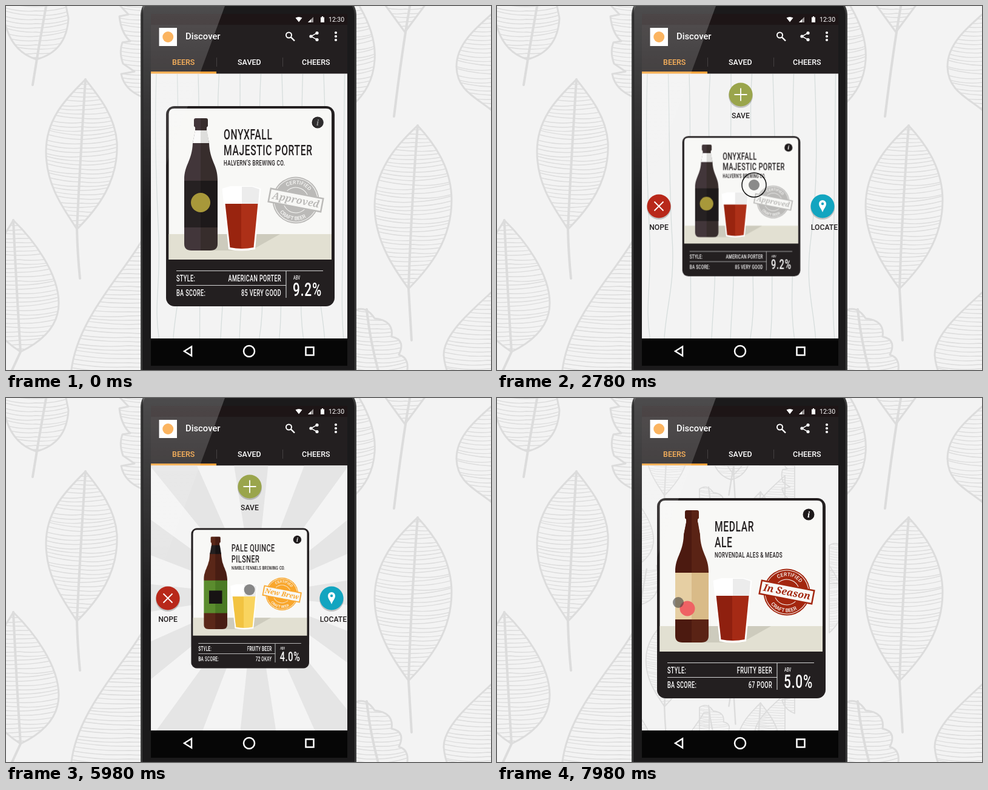
These frames come from a looping animation (800 by 600 pixels, 8 s). An HTML page:

```html
<!DOCTYPE html>
<html lang="en">
<head>
<meta charset="utf-8">
<title>Beer discovery app</title>
<style>
  html, body { margin: 0; width: 100%; height: 100%; overflow: hidden; background: #f3f3f3; }
  #stage, #stage > *, .full { position: absolute; left: 0; top: 0; width: 800px; height: 600px; }
  #stage { overflow: hidden; }
  #screen { clip-path: inset(111.5px 237px 52px 239px); background: #f3f3f3; }
  .card { position: absolute; left: 264px; top: 165px; width: 278px; height: 330px; overflow: visible; }
  text { font-family: Roboto, sans-serif; }
  .narrow { font-weight: 500; letter-spacing: .04em; }
  .medium { font-weight: 500; }
  .info { font: italic bold 15px "Liberation Serif", serif; }
  .script { font: italic 600 16px "Noto Serif", serif; }
</style>
</head>
<body>
<div id="stage">
  <svg id="backdrop"></svg>
  <div id="screen"></div>
  <svg id="overlay"></svg>
</div>
<script>
const INK = '#231f20', PAPER = '#f8f8f6', ORANGE = '#faa33c', LEAF = '#dcdcdc';
const $ = id => document.getElementById(id);
const range = n => [...Array(n).keys()];

let seed = 7;
const random = () => (seed = seed * 16807 % 2147483647) / 2147483647;

const text = (x, y, size, str, attrs = '') =>
  `<text x="${x}" y="${y}" font-size="${size}" ${attrs}>${str}</text>`;
const narrow = (x, y, size, str, attrs = '') =>
  `<text class="narrow" transform="translate(${x} ${y}) scale(.65 1)" font-size="${size}" ${attrs}>${str}</text>`;
const rect = (x, y, w, h, fill, rx = 0) =>
  `<rect x="${x}" y="${y}" width="${w}" height="${h}" rx="${rx}" fill="${fill}"/>`;
const circle = (x, y, r, fill) => `<circle cx="${x}" cy="${y}" r="${r}" fill="${fill}"/>`;
const line = (d, color, width) => `<path d="${d}" fill="none" stroke="${color}" stroke-width="${width}"/>`;
const END = 'text-anchor="end"', MIDDLE = 'text-anchor="middle"';

// ---------- Leaves ----------
let leafCount = 0;
function leaf(outline, [x0, y0, x1, y1], rib) {
  const id = 'leaf' + leafCount++, cx = (x0 + x1) / 2;
  let veins = '';
  for (let y = y0 - 6; y < y1; y += 7) {
    const a = y + random() * 5, b = y + random() * 5;
    veins += `M${x0} ${a}Q${(x0 + cx) / 2} ${a + 9} ${cx} ${y + 10}Q${(x1 + cx) / 2} ${b + 9} ${x1} ${b}`;
  }
  return `<clipPath id="${id}"><path d="${outline}"/></clipPath>
    <path d="${veins}" stroke-width="1.4" clip-path="url(#${id})"/>
    <path d="${outline}" stroke-width="3"/><path d="${rib}" stroke-width="4"/>`;
}

const leaves = `<g id="leaves" fill="none" stroke="${LEAF}" stroke-linecap="round" stroke-linejoin="round">` +
  leaf('M-6 -20Q-8 70 50 88Q100 75 103 20L95 -20', [-6, -10, 104, 88], 'M68 -10Q55 60 44 130') +
  leaf('M165 -25L202 14L187 17Q190 45 205 58L192 60Q186 75 193 95L212 108L190 112Q195 138 225 150V-25Z', [175, -10, 290, 150], '') +
  leaf('M131 121C108 145 66 180 66 240C66 300 100 340 117 368C150 335 186 290 183 225C180 180 150 145 131 121Z',
    [64, 125, 186, 368], 'M131 121Q122 260 117 368Q118 410 122 449') +
  leaf('M12 353C45 385 87 440 87 490C87 530 55 555 24 570C0 555 -40 520 -40 470C-40 420 -5 385 12 353Z',
    [-45, 358, 88, 570], 'M12 353Q18 480 24 570L10 600') +
  leaf('M225 385C195 440 112 520 107 610H240V385Z', [105, 395, 300, 610], '') +
  leaf('M612 -20L658 43L705 -20', [612, -20, 705, 43], 'M668 -10Q655 60 640 182') +
  leaf('M570 -20Q612 40 608 90Q605 135 570 165Z', [520, -10, 610, 165], '') +
  leaf('M805 10C770 40 743 65 743 100C744 140 775 150 805 175Z', [742, 10, 860, 175], '') +
  leaf('M679 197C650 225 608 265 608 330C608 390 645 440 664 466C700 430 735 385 735 320C735 265 705 225 679 197Z',
    [607, 200, 736, 466], 'M679 197Q668 340 664 466L669 551') +
  leaf('M570 505Q592 490 608 515Q640 518 636 545Q660 550 648 575Q668 580 660 610H570Z', [560, 500, 664, 610], 'M595 500Q600 550 615 605') +
  leaf('M805 468C770 500 722 540 722 575Q724 600 735 615H805Z', [720, 475, 870, 610], '') + '</g>';

// ---------- Phone and app bar ----------
const appBar = rect(239, 13, 324, 18, '#1d1516') + rect(239, 31, 324, 81, INK) +
  `<g fill="#fff">
    <path d="M477.5 19.5q5.500 -3 11 0l-5.500 7z"/>
    <path d="M507 18v9h-9z" opacity=".55"/><path d="M503 22v5h-5z"/>
    <path d="M519 18.500h2v-1.500h2v1.500h2v8.500h-6z"/>
    ${text(532, 26, 10.5, '12:30')}
    ${text(296, 55, 14.8, 'Discover', 'class="medium"')}
    ${text(382, 96.5, 12.5, 'SAVED', 'class="medium"')}
    ${text(488, 96.5, 12.5, 'CHEERS', 'class="medium"')}
    ${[44, 50, 56].map(y => circle(544, y, 2.1, '#fff')).join('')}
    ${circle(503, 50, 2.6, '#fff') + circle(513, 44.5, 2.6, '#fff') + circle(513, 55.5, 2.6, '#fff')}
  </g>
  <circle cx="466.5" cy="48" r="4.500" fill="none" stroke="#fff" stroke-width="2"/>` +
  line('M470 51.500L476 57.500', '#fff', 2.4) + line('M513 44.500L503 50L513 55.500', '#fff', 1.5) +
  text(274, 96.5, 12.5, 'BEERS', `class="medium" fill="${ORANGE}"`) +
  line('M347.500 85V100M456.500 85V100', '#454142', 1) + rect(239, 108, 108, 4, ORANGE) +
  rect(252.5, 36, 29.5, 30, '#fff') + circle(267.2, 51, 9, ORANGE);

const navBar = rect(239, 548, 324, 45, '#060606') +
  line('M294 569L306 561.500V576.500Z', '#fff', 2.5) +
  line('M392 569a9 9 0 1 0 18 0a9 9 0 1 0 -18 0', '#fff', 2.5) +
  line('M494.500 562.500h13v13h-13z', '#fff', 2.5);

$('backdrop').innerHTML = leaves +
  '<rect x="223.500" y="-18" width="353" height="660" rx="34" fill="#1b1a1b" stroke="#3c3c3c" stroke-width="3"/>' +
  appBar + navBar +
  text(430, 90, 11, '+1', 'id="plusOne" class="medium" fill="#fff"') +
  `<defs>
    <path id="arcTop" d="M-26.500 0A26.500 26.500 0 0 1 26.500 0"/>
    <path id="arcBottom" d="M-33 0A33 33 0 0 0 33 0"/>
  </defs>`;

// ---------- Screen wallpapers ----------
const planks = range(10).map(i => {
  const x = 248 + i * 34.5, w = () => (random() - .5) * 14;
  return line(`M${x} 112C${x + w()} 220 ${x + w()} 300 ${x + w()} 380S${x + w()} 490 ${x + w()} 548`, '#d6dddc', 1.3);
}).join('');

const polar = deg => `${410 + 400 * Math.sin(deg * Math.PI / 180)} ${325 - 400 * Math.cos(deg * Math.PI / 180)}`;
const sunburst = rect(239, 111, 324, 437, '#f4f4f4') + range(12).map(i => {
  const a = i * 30 - 1.5;
  return `<path fill="#e5e5e5" d="M410 325L${polar(a - 7.5)}L${polar(a + 7.5)}Z"/>`;
}).join('');

const foliage = rect(239, 111, 324, 437, '#f3f3f3') +
  [[-8, -153], [-8, 207], [206, -60], [206, 288], [356, 82], [356, 430]].map(([x, y]) =>
    `<use href="#leaves" transform="translate(${x} ${y}) scale(.6)"/>`).join('');

// ---------- Cards ----------
const halves = (id, a, b) => `<linearGradient id="${id}">
  <stop offset=".5" stop-color="${a}"/><stop offset=".5" stop-color="${b}"/></linearGradient>`;

const panel = rect(264, 165, 278, 330, INK, 14) +
  `<path fill="${PAPER}" d="M268.500 418V178q0 -9 9 -9H528q9 0 9 9V418Z"/>`;
const info = circle(514, 192, 9.5, '#1e1a1b') +
  text(514, 197, 15, 'i', `class="info" fill="#fff" ${MIDDLE}`);

const stamp = (color, word) => `<g transform="translate(478 320) rotate(11)" fill="${PAPER}">
  ${circle(0, 0, 38.5, color)}
  <circle r="36" fill="none" stroke="${PAPER}"/><circle r="21" fill="none" stroke="${PAPER}"/>
  <text font-size="8.500" class="medium" ${MIDDLE}><textPath href="#arcTop" startOffset="50%">CERTIFIED</textPath></text>
  <text font-size="8.500" class="medium" ${MIDDLE}><textPath href="#arcBottom" startOffset="50%">CRAFT BEER</textPath></text>
  <rect x="-44" y="-11" width="88" height="22" stroke="${color}" stroke-width="2.500"/>
  ${text(0, 5, 16, word, `class="script" fill="${color}" ${MIDDLE}`)}</g>`;

function front(i, c) {
  const fill = part => `url(#${part}${i})`;
  return `<defs>${halves('glass' + i, ...c.glass)}${halves('label' + i, ...c.label)}
    ${halves('neck' + i, ...c.neck)}${halves('beer' + i, ...c.beer)}${halves('foam' + i, '#fff', '#ececec')}</defs>` +
    panel + rect(268.5, 376, 268.5, 42, '#e2e0d2') +
    `<path fill="#cdcbbd" d="M350 376H452L404 403H325Z"/>
    <path fill="${fill('glass')}" d="M310 188q0 -3 3 -3h17q3 0 3 3v10l-2 2v6L335 226C336 255 349 262 349 286V392
      Q349 403 337 403H306Q294 403 294 392V286C294 262 307 255 308 226L312 206v-6l-2 -2Z"/>
    <path fill="${fill('neck')}" d="M312 205H331.500L335 226H308Z"/>` +
    rect(294, 288, 55, 77, fill('label')) + c.emblem +
    `<path fill="#fff" d="M356.500 301L370 297H407L420.500 301L411 401Q389 406 367 401Z"/>
    <path fill="${fill('foam')}" d="M359 302L371 298H406L418 302L416 326H361Z"/>
    <path fill="${fill('beer')}" d="M361.500 326H415.500L408.500 398Q389 402 369.500 398Z"/>` +
    stamp(...c.stamp) + info +
    `<g fill="${INK}">${narrow(359, 220, 24, c.name[0]) + narrow(359, 245.5, 24, c.name[1]) + narrow(359, 263, 12.5, c.brewer)}</g>` +
    line('M281 436.500H523M281 460.500H462M462 436.500V481', '#d5d5d5', 1.1) +
    `<g fill="#fff">${narrow(281, 453.5, 14, 'STYLE:') + narrow(454, 453.5, 14, c.style, END) +
      narrow(281, 477.5, 14, 'BA SCORE:') + narrow(454, 477.5, 14, c.score, END) +
      narrow(474, 451, 8.5, 'ABV') + narrow(473, 477.5, 32, c.abv)}</g>`;
}

const story = ['Halvern\u2019s Onyxfall Majestic Porter is loaded with', 'magnificent and robust flavor. Aged for seven',
  'months in Caribbean rum barrels, roasted malt', 'and chocolate character abound in this velvety,', 'nectarous ale.'];

const back = c => panel + info + `<g fill="${INK}">` +
  narrow(300, 213, 24, c.name[0]) + narrow(300, 238, 24, c.name[1]) + narrow(300, 254.5, 12.5, c.brewer) +
  story.map((s, i) => text(300, 281 + i * 12.5, 8.8, s)).join('') +
  narrow(300, 377, 14, 'LOCATION:') + narrow(446, 377, 14, 'OAKVILLE, ON', END) +
  narrow(300, 404, 14, 'VOLUME:') + narrow(446, 404, 14, '650 ML', END) + '</g>' +
  line('M300 355.500H507M300 385H455M455 355.500V407', INK, 1.3) + circle(484, 384, 21, '#a82a12') +
  `<g fill="#fff">${narrow(403, 455, 18, '\u201cDARK &amp; INTRIGUING AS THE', MIDDLE) +
    narrow(403, 474, 18, 'MIDNIGHT SKY\u201d', MIDDLE)}</g>`;

const NEVER = 1e9;
const cards = [
  { name: ['ONYXFALL', 'MAJESTIC PORTER'], brewer: 'HALVERN\u2019S BREWING CO.', style: 'AMERICAN PORTER', score: '85 VERY GOOD', abv: '9.2%',
    glass: ['#42363a', '#372d2c'], label: ['#262122', '#1d191a'], neck: ['#fafafa', '#dededc'], beer: ['#99240f', '#ad3018'],
    emblem: circle(321, 324, 16, '#a8983a'), stamp: ['#bbbab8', 'Approved'],
    enter: -NEVER, grab: [424, 295], shrink: 2560, release: 4080, target: [402, 146] },
  { name: ['PALE QUINCE', 'PILSNER'], brewer: 'NIMBLE FENNELS BREWING CO.', style: 'FRUITY BEER', score: '72 OKAY', abv: '4.0%',
    glass: ['#5a2718', '#481d13'], label: ['#5b8c2e', '#4a7a24'], neck: ['#231f20', '#171314'], beer: ['#f2c341', '#f9d45f'],
    emblem: rect(306, 312, 31, 31, '#171314'), stamp: ['#f9a62b', 'New Brew'],
    enter: 4420, grab: [402, 316], shrink: 5480, release: 6980, target: [267, 330] },
  { name: ['MEDLAR', 'ALE'], brewer: 'NORVENDAL ALES &amp; MEADS', style: 'FRUITY BEER', score: '67 POOR', abv: '5.0%',
    glass: ['#4c1a10', '#5a2315'], label: ['#e6cfa3', '#d9bb88'], neck: ['#4c1a10', '#5a2315'], beer: ['#8f200f', '#a52a15'],
    emblem: circle(314, 347, 12.5, '#ef6264'), stamp: ['#a3260f', 'In Season'],
    enter: 7280, grab: [0, 0], shrink: NEVER, release: NEVER, target: [0, 0] },
];

// ---------- Drop targets ----------
const buttons = [
  { x: 402, y: 146, label: 'SAVE', color: '#9aa54c', icon: line('M-10.500 0H10.500M0 -10.500V10.500', '#fff', 1.8) },
  { x: 267, y: 330, label: 'NOPE', color: '#b8281a', icon: line('M-7.500 -7.500L7.500 7.500M7.500 -7.500L-7.500 7.500', '#fff', 1.8) },
  { x: 537, y: 330, label: 'LOCATE', dx: 3, color: '#12a5c0',
    icon: '<path fill="#fff" d="M0 10C-2 4 -6 1 -6 -4a6 6 0 0 1 12 0C6 1 2 4 0 10Z"/>' + circle(0, -4, 2.2, '#12a5c0') },
];

const cardSvg = (id, body) => `<svg class="card" id="${id}" viewBox="264 165 278 330">${body}</svg>`;
$('screen').innerHTML =
  `<svg class="full">${planks}<g id="sunburst">${sunburst}</g><g id="foliage">${foliage}</g></svg>` +
  cards.map((c, i) => cardSvg('card' + i, front(i, c))).join('') + cardSvg('cardBack', back(cards[0])) +
  '<svg class="full">' + buttons.map(b => `<g id="${b.label}">${circle(0, 2, 20, '#0003') + circle(0, 0, 19.5, b.color)}${b.icon}
    ${text(b.dx || 0, 38.5, 12.2, b.label, `class="medium" fill="${INK}" ${MIDDLE}`)}</g>`).join('') + '</svg>';

const rippleStarts = [2620, 4020, 4180, 5520, 6780, 6940];
$('overlay').innerHTML = `<linearGradient id="sheen" x2="0" y2="1"><stop stop-color="#fff" stop-opacity=".22"/>
  <stop offset="1" stop-color="#fff" stop-opacity="0"/></linearGradient>
  <path fill="url(#sheen)" d="M226 0H361L226 365Z"/>
  <g id="pointer"><circle id="dot" r="9" fill="#3c3c3c" fill-opacity=".58"/>
  ${rippleStarts.map((_, i) => `<circle id="ripple${i}" fill="none" stroke="#111" stroke-width="1.500"/>`).join('')}</g>`;

// ---------- Motion ----------
const mix = (a, b, p) => a + (b - a) * p;
const linear = (t, a, b) => Math.min(1, Math.max(0, (t - a) / (b - a)));
const ramp = (t, a, b) => (1 - Math.cos(Math.PI * linear(t, a, b))) / 2;
const track = (t, keys) => keys.reduce((v, [time, value], i) =>
  i ? mix(v, value, ramp(t, keys[i - 1][0], time)) : value, 0);

const dotX = [[1500, 515], [2350, 424], [3050, 424], [3900, 429], [4400, 429], [4800, 423], [5000, 423], [5400, 402],
  [5950, 402], [6700, 291], [7200, 291], [7600, 299]];
const dotY = [[1500, 192], [2350, 295], [3050, 295], [3900, 151], [4400, 151], [4800, 181], [5000, 181], [5400, 316],
  [5950, 316], [6700, 336], [7200, 336], [7600, 337]];
const flip = [[100, 0], [720, 180], [860, 180], [1480, 0]];

// A button pops in, then either swells under the held card or bows out.
function buttonScale(t, label) {
  const round = t < 4400 ? { start: 2600, chosen: 'SAVE', hover: 3500, end: 4120 }
    : { start: 5520, chosen: 'NOPE', hover: 6350, end: 7020 };
  const shown = ramp(t, round.start, round.start + 140), over = ramp(t, round.hover, round.hover + 300);
  return label === round.chosen ? shown * (1 + .58 * over) * (1 - ramp(t, round.end, round.end + 140))
    : shown * (1 - over);
}

function poseCard(el, c, t, x, y, turn) {
  const held = ramp(t, c.shrink, c.shrink + 180), gone = ramp(t, c.release, c.release + 160);
  const dx = (x - c.grab[0]) * held, dy = (y - c.grab[1]) * held;
  const scale = ramp(t, c.enter, c.enter + 340) * (1 - .3 * held) * (1 - gone);
  const cx = mix(dx * .7, c.target[0] - 403, gone), cy = mix(dy * .715, c.target[1] - 330, gone);
  el.style.transform = `translate(${cx}px, ${cy}px) scale(${scale}) perspective(850px)
    rotateX(${-dy * .21}deg) rotateY(${turn + dx * .37}deg)`;
  el.style.visibility = scale > .001 ? 'visible' : 'hidden';
}

function draw(now) {
  const elapsed = now % 8000;
  const t = elapsed < 100 ? 0 : 100 + 40 * Math.floor((elapsed - 100) / 40);
  const x = track(t, dotX), y = track(t, dotY), turn = track(t, flip);

  cards.forEach((c, i) => poseCard($('card' + i), c, t, x, y, i ? 0 : turn));
  poseCard($('cardBack'), cards[0], t, x, y, turn - 180);
  if (turn > 90) $('card0').style.visibility = 'hidden';
  else $('cardBack').style.visibility = 'hidden';

  $('sunburst').setAttribute('opacity', ramp(t, 4160, 4400));
  $('foliage').setAttribute('opacity', ramp(t, 7060, 7300));
  $('plusOne').setAttribute('opacity', track(t, [[4400, 0], [4500, 1], [4750, 1], [5030, 0]]));

  for (const b of buttons)
    $(b.label).setAttribute('transform', `translate(${b.x} ${b.y}) scale(${buttonScale(t, b.label)})`);

  $('pointer').setAttribute('transform', `translate(${x} ${y})`);
  $('dot').setAttribute('opacity', track(t, [[6860, 1], [6940, .3], [7000, .3], [7100, 1]]));
  rippleStarts.forEach((start, i) => {
    const p = linear(t, start, start + 320), ring = $('ripple' + i);
    ring.setAttribute('r', 10 + 20 * p);
    ring.setAttribute('opacity', t < start ? 0 : 1 - linear(p, .6, 1));
  });
  requestAnimationFrame(draw);
}
requestAnimationFrame(draw);
</script>
</body>
</html>
```
